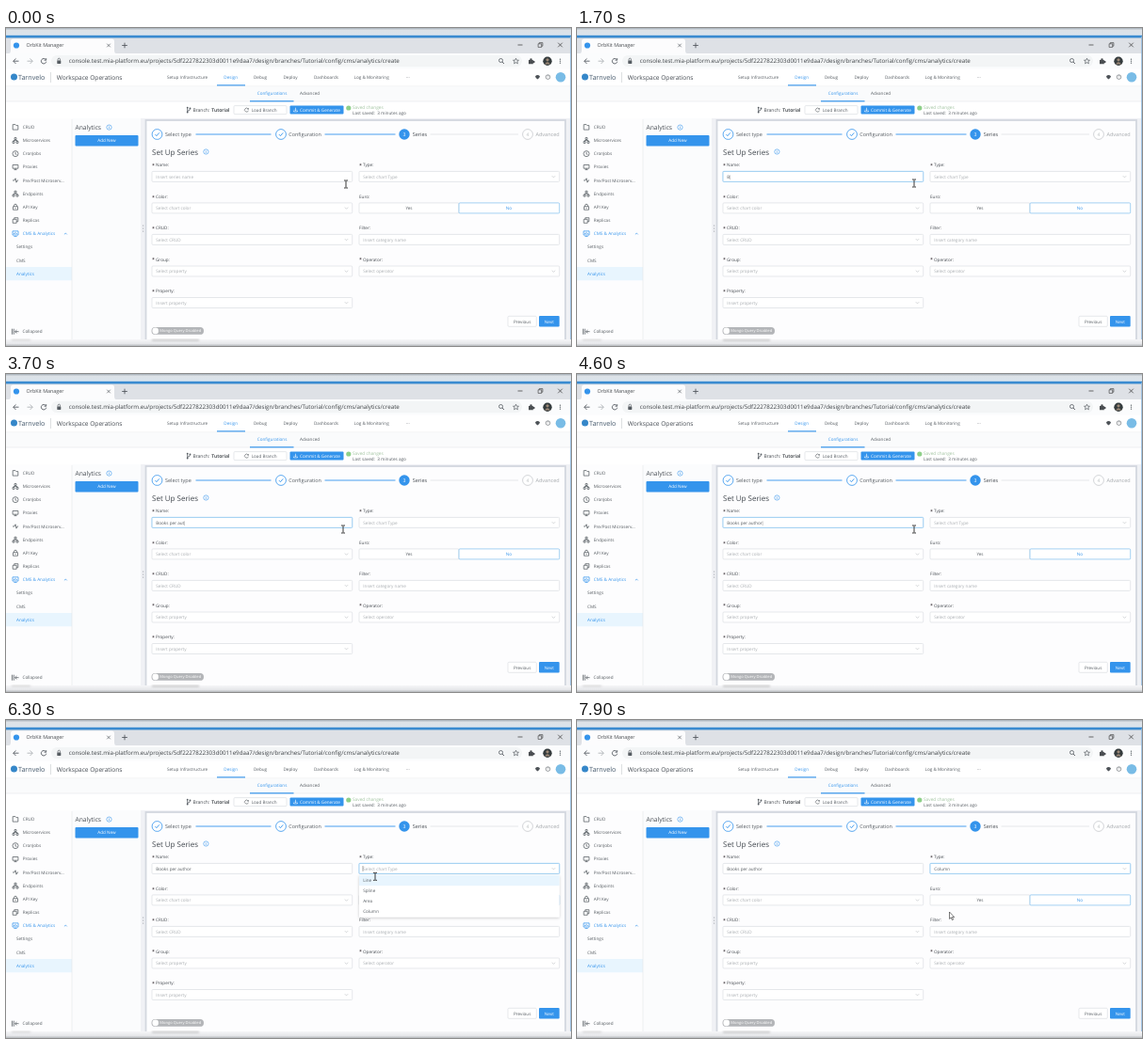
These frames come from a looping animation (600x338 px, 8000 ms). An HTML page:

```html
<!DOCTYPE html>
<html lang="en">
<head>
<meta charset="utf-8">
<title>Set Up Series</title>
<style>
html, body { margin: 0; width: 100%; height: 100%; overflow: hidden; background: #fff; }
svg { display: block; width: 100%; height: 100%; }
text { font-family: "Open Sans", "Noto Sans", sans-serif; text-rendering: geometricPrecision; white-space: pre; }
</style>
</head>
<body>
<svg viewBox="0 0 600 338">
  <defs>
    <linearGradient id="top" x2="0" y2="1">
      <stop offset="0" stop-color="#a3adb6"/><stop offset=".25" stop-color="#dde2e7"/><stop offset="1" stop-color="#d9e4ee"/>
    </linearGradient>
    <linearGradient id="bottom" x2="0" y2="1">
      <stop offset="0" stop-color="#f6f6f8"/><stop offset=".65" stop-color="#e6e7ea"/><stop offset="1" stop-color="#b4b7bb"/>
    </linearGradient>
    <filter id="shade" x="-5%" y="-10%" width="110%" height="130%">
      <feDropShadow dx="0" dy="1" stdDeviation="1.6" flood-opacity=".2"/>
    </filter>
    <filter id="blur"><feGaussianBlur stdDeviation="1"/></filter>
  </defs>
  <g id="page"></g>
  <g id="live"></g>
</svg>
<script>
const BLUE = '#3494ec', RIM = '#7dbdec', INK = '#555b61', PALE = '#a9adb1', EDGE = '#dcdee2';
const LOOP = 8000, ENTRY = 'Books per author';
const page = document.getElementById('page'), live = document.getElementById('live');

// Text is placed by the middle of its line.
const text = (x, y, s, fill = INK, size = 4.62, more = '') =>
  `<text x="${x}" y="${y + size * .36}" font-size="${size}" fill="${fill}" ${more}>${s}</text>`;
const mid = (x, y, s, fill, size) => text(x, y, s, fill, size, 'text-anchor="middle"');
const rect = (x, y, w, h, fill, more = '') =>
  `<rect x="${x}" y="${y}" width="${w}" height="${h}" fill="${fill}" ${more}/>`;
const box = (x, y, w, h, stroke = EDGE, fill = '#fff') =>
  rect(x, y, w, h, fill, `rx="1" stroke="${stroke}" stroke-width=".7"`);
const dot = (x, y, r, fill, more = '') => `<circle cx="${x}" cy="${y}" r="${r}" fill="${fill}" ${more}/>`;
const line = (d, stroke = INK, w = .7, more = '') =>
  `<path d="${d}" fill="none" stroke="${stroke}" stroke-width="${w}" ${more}/>`;
const icon = (x, y, d, stroke = INK, w = .7) => line(d, stroke, w, `transform="translate(${x} ${y})"`);
const info = (x, y) => dot(x, y, 2.6, 'none', `stroke="${BLUE}" stroke-width=".6"`) +
  line(`M${x} ${y - .4}v1.8M${x} ${y - 1.5}v.6`, BLUE, .6);
const chevron = (x, y) => icon(x, y, 'M-1.7 -.8L0 .9L1.7 -.8', '#b9bcc0', .6);
const label = (x, y, s, star = true) =>
  (star ? text(x, y + .6, '*', '#4b4448', 5.4, 'font-weight="600"') : '') + text(x + (star ? 4 : 0), y, s + ':', '#454a50');

function field(x, y, hint, select) {
  return box(x, y - 5.5, 212.7, 11, EDGE) + text(x + 4.3, y, hint, PALE) + (select ? chevron(x + 206.5, y) : '');
}

function browser() {
  return rect(0, 0, 600, 9, 'url(#top)') + rect(0, 10, 600, 17.5, '#dee1e6') + rect(0, 7.8, 600, 2.7, '#3a8bd0') +
    '<path d="M2 27.5Q5 27 5 24V14Q5 11.5 8 11.5H112Q115 11.5 115 14V24Q115 27 118 27.5Z" fill="#fcfcfd"/>' +
    dot(11, 18.5, 3.1, BLUE) + text(21.5, 18.5, 'OrbKit Manager', '#45494d', 5.4) +
    icon(109, 18.5, 'M-1.8 -1.8L1.8 1.8M1.8 -1.8L-1.8 1.8') +
    icon(126, 18.5, 'M-2.8 0H2.8M0 -2.8V2.8', INK, .9) +
    icon(546, 18, 'M-2.5 0H2.5', '#333') +
    icon(567.5, 18, 'M-2.4 -1.2H1.2V2.4H-2.4ZM-1.2 -1.2V-2.4H2.4V1.2H1.2', '#333', .6) +
    icon(588.5, 18, 'M-2.3 -2.3L2.3 2.3M2.3 -2.3L-2.3 2.3', '#333') +
    rect(0, 27, 600, 16.5, '#fbfcfd') + rect(48, 29, 500, 12.2, '#f3f5f6', 'rx="6.1"') +
    icon(10.5, 35.2, 'M3 0H-2.7M0 -2.8L-2.8 0L0 2.8', INK, .9) +
    icon(25.5, 35.2, 'M-3 0H2.7M0 -2.8L2.8 0L0 2.8', '#b2b5b8', .9) +
    icon(40, 35.2, 'M2.2 -1.6A2.7 2.7 0 1 0 2.7 .5M2.7 -3V-1H.6', INK, .9) +
    rect(54.3, 34.4, 4, 3.6, INK, 'rx=".4"') + icon(56.3, 34, 'M-1.2 .6V-.6A1.2 1.2 0 0 1 1.2 -.6V.6') +
    text(66.8, 35.2, 'console.test.mia-platform.eu/projects/5df2227822303d0011e9daa7/design/branches/Tutorial/config/cms/analytics/create', '#3e4246', 6.21) +
    dot(525.5, 34.5, 2, 'none', `stroke="${INK}" stroke-width=".8"`) + icon(527, 36, 'M0 0L2 2', INK, .9) +
    icon(541.5, 35.2, 'M0 -3L.9 -1L3 -.9L1.4 .5L1.9 2.6L0 1.5L-1.9 2.6L-1.4 .5L-3 -.9L-.9 -1Z') +
    '<path d="M555 33.9H556.4A1.2 1.2 0 1 1 558.6 33.9H559.8V35A1.2 1.2 0 1 1 559.8 37V38.2H555Z" fill="#4a4e52"/>' +
    dot(575, 35.2, 4.7, '#343b3d') + dot(575, 33.8, 1.6, '#9b8877') + '<path d="M572 38.5Q575 33.8 578 38.5Z" fill="#9b8877"/>' +
    [-2, 0, 2].map(d => dot(588.5, 35.2 + d, .65, INK)).join('');
}

function header() {
  const tabs = [[171, 'Setup Infrastructure'], [231.3, 'Design'], [263, 'Debug'], [294.5, 'Deploy'],
    [327, 'Dashboards'], [369.5, 'Log &amp; Monitoring'], [425, '···']];
  return dot(8.5, 52, 3.5, '#3587c9') + text(13, 52.6, 'Tarnvelo', '#43576a', 7.15) +
    line('M47.5 47V58', '#cfd2d5') + text(53.7, 52.6, 'Workspace Operations', '#454b52', 6.6) +
    tabs.map(([x, s]) => text(x, 52.2, s, s === 'Design' ? BLUE : INK)).join('') +
    rect(224, 60.3, 30, 1.3, BLUE) + line('M0 62H600', '#e4e6e9', .6) +
    '<path d="M562 51.2Q564.5 49 567 51.2Q566.8 53.2 564.5 54.6Q562.2 53.2 562 51.2Z" fill="#4d5257"/>' +
    dot(575.5, 52.1, 2.3, 'none', `stroke="${INK}" stroke-width=".6"`) + mid(575.5, 52.1, '?', INK, 3.6) +
    dot(589, 52.2, 5.3, '#79bce6') +
    rect(0, 62.3, 600, 16, '#fafbfc') + text(266.8, 69.7, 'Configurations', BLUE) + text(312, 69.7, 'Advanced') +
    line('M0 78H600', '#e4e6e9', .6) + rect(259, 77.2, 46.5, 1.2, BLUE) +
    icon(194, 87, 'M-1.3 -2.2V2.3M-1.3 1.2Q1.5 1 1.5 -1.2', INK, .8) +
    [[-1.3, -2.4], [-1.3, 2.5], [1.5, -1.7]].map(([x, y]) => dot(194 + x, 87 + y, .9, INK)).join('') +
    text(198.4, 87, 'Branch:', '#3f444a', 5) + text(218.3, 87, 'Tutorial', '#33383d', 5.15, 'font-weight="600"') +
    box(242, 82.6, 56, 9) + icon(255.5, 87.1, 'M1.7 -1A2 2 0 1 0 1.9 .6M2 -2V-.8H.8', INK, .6) + text(260.7, 87, 'Load Branch') +
    rect(301.5, 82.5, 57, 9, BLUE, 'rx="1"') + icon(307.5, 86.7, 'M0 -2V1M-1.2 0L0 1.2L1.2 0M-2 1V2.2H2V1', '#fff', .6) +
    text(312, 87, 'Commit &amp; Generate', '#fff') +
    dot(363.8, 85, 2.6, '#8fd08a') + text(368, 84.5, 'Saved changes', '#a1c3a0', 4.75) +
    text(368, 90, 'Last saved:  3 minutes ago', INK, 4.65);
}

function sidebar() {
  const glyph = {
    sheet: 'M-2.8 -2.7H0L.9 -1.7H2.8V2.8H-2.8Z',
    net: 'M-1 -2.9H1V-1H-1ZM-3 1H-1V2.9H-3ZM1 1H3V2.9H1ZM0 -1V0M-2 1V0H2V1',
    clock: 'M-3 0A3 3 0 1 0 3 0A3 3 0 1 0 -3 0M0 -1.8V.2L1.4 1',
    link: 'M-2.9 -2.3H2.9V1.4H-2.9ZM-1.5 2.8H1.5M0 1.4V2.8',
    plug: 'M-3 0H-1L0 -2.2L1 2.2L2 0H3',
    lock: 'M-2.5 -.6H2.5V2.9H-2.5ZM-1.5 -.6V-1.6A1.5 1.5 0 0 1 1.5 -1.6V-.6M0 .7V1.7',
    copy: 'M-2.8 -1.2H1.2V2.8H-2.8ZM-1.2 -1.2V-2.8H2.8V1.2H1.2',
    chart: 'M-3 -2.8H3V1.4H-3ZM-1.6 2.9H1.6M-1.5 .4V-.8M0 .4V-1.8M1.5 .4V-.4'
  };
  const items = [['CRUD', 'sheet'], ['Microservices', 'net'], ['CronJobs', 'clock'], ['Proxies', 'link'],
    ['Pre/Post Microserv...', 'plug'], ['Endpoints', 'net'], ['API Key', 'lock'], ['Replicas', 'copy'], ['CMS &amp; Analytics', 'chart']];
  return rect(0, 96, 70, 235, '#fdfdfe') + rect(70, 96, 73, 235, '#fbfcfd') + rect(0, 254, 70, 14.3, '#e8f5fe') +
    items.map(([s, g], i) => {
      const y = 105.3 + i * 14.17, c = i === 8 ? BLUE : INK;
      return icon(10, y, glyph[g], c, .75) + text(17.8, y, s, c);
    }).join('') +
    icon(63.3, 218.8, 'M-1.4 .6L0 -.8L1.4 .6', BLUE) +
    text(11, 232.8, 'Settings') + text(11, 247, 'CMS') + text(11, 261.2, 'Analytics', BLUE) +
    icon(9.5, 322.7, 'M-3 -3V3M-1.2 -3V3M4 0H.2M1.8 -1.6L.2 0L1.8 1.6', INK, .8) + text(17.5, 322.7, 'Collapsed') +
    line('M70 97V331', '#e6e8ea') + text(73.5, 105.6, 'Analytics', '#454b52', 6.7) + info(109.5, 105.6) +
    rect(73.5, 114, 67, 11.5, BLUE, 'rx="1"') + mid(107, 119.8, 'Add New', '#fff');
}

function form() {
  const ring = (x, c) => dot(x, 113, 5.4, '#fff', `stroke="${c}" stroke-width=".8"`);
  const check = x => ring(x, BLUE) + icon(x, 113, 'M-2.1 .1L-.6 1.7L2.2 -1.6', BLUE, .9);
  return rect(143, 96, 457, 235.5, '#f0f1f5') +
    rect(148.5, 98, 445.5, 240, '#fdfdfe', 'stroke="#d3d7df" stroke-width="1.8"') +
    [-3, 0, 3].map(d => dot(145.6, 213 + d, .6, '#8f9499')).join('') +
    check(160.5) + text(169, 113, 'Select type', INK, 5.5) + line('M201.5 113H281.5', BLUE, .9) +
    check(292) + text(300.3, 113, 'Configuration', INK, 5.45) + line('M338.5 113H413.5', BLUE, .9) +
    dot(423, 113, 5.7, BLUE) + mid(423, 113, '3', '#fff', 5.2) + text(431.7, 113, 'Series', '#484d53', 5.5) +
    line('M450.5 113H544', '#dfe1e4', .8) + ring(554, '#c8cbce') + mid(554, 113, '4', '#b7babd', 5) +
    text(562.5, 113, 'Advanced', '#a4a8ac', 5.5) +
    text(155, 132, 'Set Up Series', '#43494f', 8) + info(212.4, 131.5) +
    label(155, 145.7, 'Name') + label(375, 145.7, 'Type') +
    label(155, 179, 'Color') + field(155, 191.4, 'Select chart color', true) +
    label(375, 179, 'Euro', false) + box(375, 185.9, 106, 11) + mid(428, 191.4, 'Yes') +
    box(481, 185.9, 106.7, 11, RIM) + mid(534, 191.4, 'No', BLUE) +
    label(155, 212.3, 'CRUD') + field(155, 224.9, 'Select CRUD', true) +
    label(375, 212.3, 'Filter', false) + field(375, 224.9, 'Insert category name') +
    label(155, 245.9, 'Group') + field(155, 258.5, 'Select property', true) +
    label(375, 245.9, 'Operator') + field(375, 258.5, 'Select operator', true) +
    label(155, 279.6, 'Property') + field(155, 292, 'Insert property', true) +
    box(533, 306.3, 30.3, 11) + mid(548.2, 311.9, 'Previous') +
    rect(566, 306, 21.7, 11.6, BLUE, 'rx="1"') + mid(576.8, 311.9, 'Next', '#fff') +
    rect(154.5, 318, 55.5, 7.8, '#b3b5b8', 'rx="3.9"') + dot(158.7, 321.9, 3.3, '#fff') +
    text(163.3, 321.9, 'Mongo Query Disabled', '#fff', 4.1) +
    rect(0, 331, 600, 7, 'url(#bottom)') +
    '<g filter="url(#blur)" opacity=".5">' + rect(155, 330.5, 50, 2.5, '#aaa') + rect(6, 330.5, 20, 2, '#bbb') + '</g>' +
    rect(599.2, 9, .8, 322, '#8fbbe2');
}

// Piecewise path through [time, ...values].
function along(keys, t, ease = u => u) {
  const i = keys.findIndex(k => k[0] > t);
  if (i < 0) return keys[keys.length - 1].slice(1);
  if (i === 0) return keys[0].slice(1);
  const a = keys[i - 1], b = keys[i], u = ease((t - a[0]) / (b[0] - a[0]));
  return a.slice(1).map((v, j) => v + (b[j + 1] - v) * u);
}
const smooth = u => u * u * (3 - 2 * u);
const typing = [[1600, 1], [2950, 8], [3650, 13], [4100, 16]];
const route = [[300, 361, 166], [1000, 358, 165], [4600, 358, 165], [5200, 386, 163.5], [5700, 386, 163],
  [6200, 392, 166], [6600, 392, 168], [7100, 390, 203], [7400, 390, 203], [7750, 397, 208]];

const pointers = {
  beam: '<path d="M-2 -4H-.6L0 -3.5L.6 -4H2M0 -3.5V3.5M-2 4H-.6L0 3.5L.6 4H2" fill="none" stroke="#222" stroke-width=".9"/>',
  hand: '<path d="M-1.4 -4Q-.5 -5 .2 -4V-1L3.5 -.2Q4.4 .2 4.2 1.5L3.4 5H-.6L-3.2 1.4Q-3 .2 -1.4 1.4Z" fill="#fff" stroke="#555" stroke-width=".65"/><path d="M1.3 -.6V1.3M2.7 -.3V1.3" stroke="#555" stroke-width=".4"/>',
  arrow: '<path d="M-1.5 -4V3.4L.2 1.9L1.4 4.6L2.6 4.1L1.4 1.5H3.7Z" fill="#fff" stroke="#333" stroke-width=".65"/>'
};

function entry(x, s, hint, focus, caret, select) {
  const glow = focus ? rect(x - .7, 151.7, 214.1, 12.4, '#e3f1fc', 'rx="1.4"') : '';
  const mark = caret ? '<tspan fill="#666" font-size="4.8" dx="-1">|</tspan>' : '';
  return glow + box(x, 152.4, 212.7, 11, focus ? RIM : EDGE) +
    (s ? text(x + 4.3, 158, s + mark, '#565b60') : text(x + 4.3, 158, hint, PALE)) +
    (caret && !s ? line(`M${x + 4} 155V160.8`, '#444', .5) : '') + (select ? chevron(x + 206.5, 158) : '');
}

function menu(y) {
  const hover = Math.max(0, Math.min(3, Math.floor((y - 165) / 11.1)));
  return rect(375, 164.7, 212.7, 44.8, '#fff', 'rx="1" filter="url(#shade)"') +
    rect(375, 165 + hover * 11.1, 212.7, 11.1, '#e8f5fe') +
    ['Line', 'Spline', 'Area', 'Column'].map((s, i) => text(379.2, 170.5 + i * 11.1, s)).join('');
}

function draw(t) {
  const [x, y] = along(route, t, smooth);
  const typed = t < 1600 ? '' : ENTRY.slice(0, Math.floor(along(typing, t)[0] + 1e-6));
  const inName = t >= 1200 && t < 5700, open = t >= 5700 && t < 7400, picked = t >= 7400;
  const pointer = t < 4700 || (t >= 6000 && t < 6500) ? 'beam' : t < 7600 ? 'hand' : 'arrow';
  live.innerHTML = entry(155, typed, 'Insert series name', inName, inName) +
    (t >= 2600 && t < 3400 ? text(155, 166.8, 'name should not contain white spaces', '#a0a4a8', 4.64) : '') +
    entry(375, picked ? 'Column' : '', 'Select chart Type', open || picked, open, true) +
    (open ? menu(y) : '') + `<g transform="translate(${x} ${y})">${pointers[pointer]}</g>`;
}

page.innerHTML = rect(0, 0, 600, 338, '#fff') + browser() + header() + sidebar() + form();
const start = performance.now();
function tick() {
  draw((performance.now() - start) % LOOP);
  requestAnimationFrame(tick);
}
tick();
</script>
</body>
</html>
```
